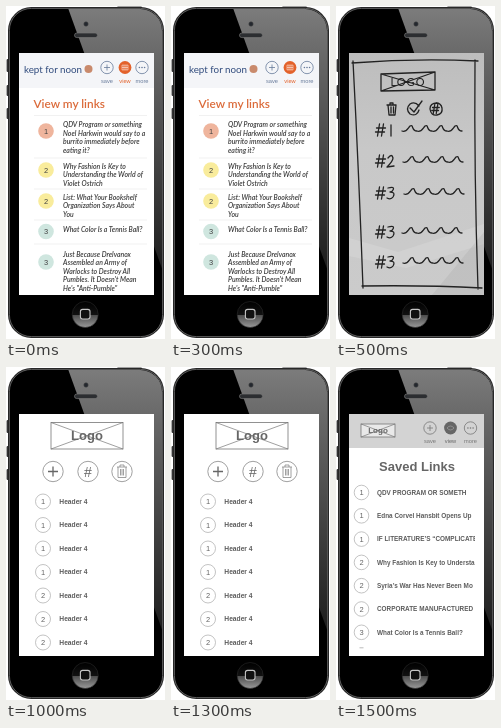
These frames come from a looping animation (159x333 px, 2000 ms). An HTML page:

```html
<!DOCTYPE html>
<html lang="en">
<head>
<meta charset="utf-8">
<title>From sketch to screen</title>
<style>
  html, body { margin: 0; width: 100%; height: 100%; overflow: hidden; background: #fff; }
  svg { display: block; width: 100vw; height: 100vh; }
  text { font-family: "Liberation Sans", Arial, sans-serif; }
  .lato { font-family: Lato, sans-serif; }
  .pen { fill: none; stroke: #222; stroke-width: 1.3; stroke-linecap: round; stroke-linejoin: round; }
</style>
</head>
<body>
<svg id="stage" viewBox="0 0 159 333"></svg>
<script>
const text = (x, y, size, fill, str, extra = '') =>
  `<text x="${x}" y="${y}" font-size="${size}" fill="${fill}" ${extra}>${str}</text>`;
const rect = (x, y, w, h, fill, extra = '') =>
  `<rect x="${x}" y="${y}" width="${w}" height="${h}" fill="${fill}" ${extra}/>`;
const circle = (x, y, r, fill, stroke = 'none', width = 0.8) =>
  `<circle cx="${x}" cy="${y}" r="${r}" fill="${fill}" stroke="${stroke}" stroke-width="${width}"/>`;
const line = (d, stroke, width = 0.8) =>
  `<path d="${d}" fill="none" stroke="${stroke}" stroke-width="${width}"/>`;
const shape = (d, fill, extra = '') => `<path d="${d}" fill="${fill}" ${extra}/>`;
const pen = d => `<path class="pen" d="${d}"/>`;
const MID = 'text-anchor="middle"', BOLD = 'font-weight="700"';

// Vertical gradient from [offset, colour] stops
const gradient = (id, stops) => `<linearGradient id="${id}" x2="0" y2="1">`
  + stops.map(([at, color]) => `<stop offset="${at}" stop-color="${color}"/>`).join('')
  + '</linearGradient>';

function phone() {
  const buttons = [[53, 13], [79, 11], [102, 11]]
    .map(([y, h]) => rect(0.6, y, 3, h, '#333', 'rx="1"')).join('');
  return '<defs>'
    + gradient('gloss', [[0, '#7c7c7c'], [0.2, '#666'], [1, '#1c1c1c']])
    + gradient('home', [[0, '#000'], [0.5, '#111'], [0.52, '#4c4c4c'], [1, '#999']])
    + gradient('paper', [[0, '#bdbdbd'], [0.4, '#c8c8c8'], [1, '#cbcbcb']])
    + `<clipPath id="body">${rect(4, 3, 152, 327, '#fff', 'rx="21.5"')}</clipPath>`
    + `<clipPath id="screen">${rect(13, 47, 135, 242, '#fff')}</clipPath></defs>`
    + buttons + rect(111, 0.4, 25, 4, '#444', 'rx="1"')
    + rect(2, 1, 156, 331, '#222', 'rx="23.5"')
    + rect(3.4, 2.4, 153.2, 328.2, '#000', 'rx="22" stroke="#666" stroke-width=".9"')
    + shape('M62 2H158V268Z', 'url(#gloss)', 'clip-path="url(#body)"')
    + circle(80, 18, 2.2, '#23272e', '#444', 0.6)
    + rect(68.5, 27, 23, 4.6, '#2c2e31', 'rx="2.3" stroke="#777" stroke-width=".7"')
    + circle(79.2, 308.5, 13, 'url(#home)', '#2a2a2a', 0.6)
    + rect(74.4, 303.4, 9.6, 9.6, '#111', 'rx="2.2" stroke="#c4c4c4" stroke-width="1.1"');
}

// Save / view / more buttons shared by both page designs
function toolbar(xs, y, color, active) {
  const [save, view, more] = xs;
  const labels = ['save', 'view', 'more'].map((name, i) =>
    text(xs[i], y + 15, 5.7, i === 1 ? active : color, name, MID)).join('');
  return circle(save, y, 6.2, 'none', color) + line(`M${save - 3} ${y}h6m-3-3v6`, color)
    + circle(view, y, 6.4, active)
    + circle(more, y, 6.2, 'none', color)
    + [-2.6, 0, 2.6].map(dx => circle(more + dx, y, 0.8, color)).join('') + labels;
}

function logoBox(x, y, w, h, size, color) {
  return rect(x, y, w, h, '#fff', `fill-opacity=".5" stroke="${color}" stroke-width=".8"`)
    + line(`M${x} ${y}l${w} ${h}M${x} ${y + h}l${w} ${-h}`, color, 0.7)
    + text(x + w / 2, y + h / 2 + size * 0.35, size, '#666', 'Logo', `${BOLD} ${MID}`);
}

const badge = (x, y, r, n, fill, stroke, color) =>
  circle(x, y, r, fill, stroke, 0.7) + text(x, y + 2.6, 7.5, color, n, MID);

function finished() {
  const salmon = '#efb59d', yellow = '#f9ec9c', mint = '#cfe6df';
  const items = [
    [125, 1, salmon, 121, ['QDV Program or something', 'Noel Harkwin would say to a', 'burrito immediately before', 'eating it?']],
    [164, 2, yellow, 162.5, ['Why Fashion Is Key to', 'Understanding the World of', 'Violet Ostrich']],
    [195, 2, yellow, 193.5, ['List: What Your Bookshelf', 'Organization Says About', 'You']],
    [225.5, 3, mint, 226, ['What Color Is a Tennis Ball?']],
    [256, 3, mint, 250.5, ['Just Because Drelvanox', 'Assembled an Army of', 'Warlocks to Destroy All', "Pumbles. It Doesn't Mean", 'He\'s "Anti-Pumble"']]
  ];
  const rows = items.map(([y, n, fill, top, lines]) =>
    badge(40, y, 7.8, n, fill, 'none', '#444')
    + lines.map((str, i) => text(57, top + i * 8.5, 6.9, '#3c3c3c', str,
      'class="lato" font-style="italic" font-weight="600"')).join('')).join('');
  const rules = [109.5, 152, 183, 214, 238]
    .map(y => line(`M28 ${y}H141`, '#e8e8e8', 0.6)).join('');
  return rect(13, 47, 135, 242, '#fff') + rect(13, 47, 135, 35, '#f4f5f8')
    + text(18, 66.5, 9.8, '#2f4a7c', 'kept for noon', 'class="lato"')
    + circle(82.5, 63, 4, '#c98a6c')
    + toolbar([101, 119, 136], 61.5, '#687b9b', '#e3622b')
    + line('M116 59.1h6v4.8h-6zM116 61.5h6M118 59.1v4.8M120 59.1v4.8', '#fff', 0.5)
    + text(27.5, 101.8, 11.8, '#db6a39', 'View my links', 'class="lato" font-weight="600"')
    + rules + rows;
}

function sketch() {
  const hash = (x, y, s = 1) =>
    pen(`M${x + 3 * s} ${y - 6 * s}l${-2 * s} ${12 * s}M${x + 7 * s} ${y - 6 * s}l${-2 * s} ${12 * s}`
      + `M${x} ${y - 2 * s}h${9 * s}M${x - s} ${y + 2 * s}h${9 * s}`);
  const digits = {
    1: 'm1-5v11',
    2: 'm-2-3q4-5 5 0q0 3-6 9l7-1',
    3: 'm-2-5q7-2 5 2q-1 2-3 2q6 0 3 5q-2 3-6 1'
  };
  const rows = [[124, 1], [155, 2], [187, 3], [226, 3], [256, 3]].map(([y, n], i) =>
    hash(40.5, y) + pen(`M54 ${y}${digits[n]}`)
    + pen(`M${66 + i % 3} ${y + 1}` + 'c4 2 6-3 8-5c4-2 1 5 7 5'.repeat(4))).join('');
  const folds = shape('M13 232L62 246L148 218V238L70 262L13 250Z', '#ddd', 'opacity=".35"')
    + shape('M96 289L148 226V289Z', '#aaa', 'opacity=".3"');
  return rect(13, 47, 135, 242, 'url(#paper)') + folds
    + pen('M16 57Q80 52 142 55M139 54Q138 170 142 283M26 280Q90 279 146 282M17 55Q23 170 27 282')
    + pen('M45 68L99 66L99 84L45 85ZM45 68L99 84M45 85L99 66')
    + text(72, 80, 11, '#222', 'LOGO', `${MID} class="lato" letter-spacing="1"`)
    + pen('M51 99h9M54 99v-2h3v2M52 99l1 10h6l1-10M55 101v6M57.5 101v6')
    + pen('M83 100Q79 95 74 98Q69 103 74 108Q81 111 83 104M74 102l4 4l8-11')
    + pen('M101 97Q94 97 94 103Q95 110 101 109Q107 108 106 102Q105 97 100 97') + hash(96.5, 103, 0.75)
    + rows;
}

function wireframe() {
  const rows = [1, 1, 1, 1, 2, 2, 2].map((n, i) => {
    const y = 134.5 + i * 23.5;
    return badge(37, y, 7.5, n, '#fff', '#aaa', '#666')
      + text(53.3, y + 2.3, 6.7, '#5c5c5c', 'Header 4', BOLD);
  }).join('');
  return rect(13, 47, 135, 242, '#fff') + logoBox(45, 55.5, 72, 26.5, 13, '#777')
    + [47, 82, 116].map(x => circle(x, 104.5, 10.2, '#fff', '#888')).join('')
    + line('M42 104.5h10m-5-5v10', '#666', 1.3)
    + text(82, 109.5, 14, '#666', '#', MID)
    + line('M111 100h10M114 100v-2h4v2M112 100v10.5h8V100M114.5 102v6.5M116 102v6.5M117.5 102v6.5', '#888', 0.8)
    + rows;
}

function mockup() {
  const titles = [
    [1, 'QDV PROGRAM OR SOMETH'], [1, 'Edna Corvel Hansbit Opens Up'],
    [1, 'IF LITERATURE’S “COMPLICATE'], [2, 'Why Fashion Is Key to Understa'],
    [2, 'Syria’s War Has Never Been Mo'], [2, 'CORPORATE MANUFACTURED'],
    [3, 'What Color Is a Tennis Ball?']
  ];
  const rows = titles.map(([n, str], i) => {
    const y = 125.5 + i * 23.3;
    return badge(25.5, y, 7.3, n, '#fff', '#aaa', '#666') + text(41, y + 2.3, 6.4, '#5c5c5c', str, BOLD);
  }).join('');
  return rect(13, 47, 135, 242, '#fff') + rect(13, 47, 135, 34, '#d3d3d3')
    + logoBox(25, 57, 34, 13, 8, '#777')
    + toolbar([94, 114.5, 134.5], 61, '#777', '#666')
    + line('M111 61q3.5-4 7 0q-3.5 4-7 0', '#aaa', 0.6)
    + text(81, 104, 13, '#666', 'Saved Links', `${BOLD} ${MID}`)
    + rows + rect(139, 82, 9, 207, '#fff') + line('M23.5 280.8h4', '#aaa');
}

const stage = document.getElementById('stage');
stage.innerHTML = phone() + '<g clip-path="url(#screen)">'
  + [finished, sketch, wireframe, mockup].map(draw => `<g class="view">${draw()}</g>`).join('') + '</g>';
const views = [...stage.querySelectorAll('.view')];

const start = performance.now();
function tick() {
  const current = Math.floor((performance.now() - start) % 2000 / 500);
  views.forEach((view, i) => { view.style.display = i === current ? '' : 'none'; });
  requestAnimationFrame(tick);
}
tick();
</script>
</body>
</html>
```
